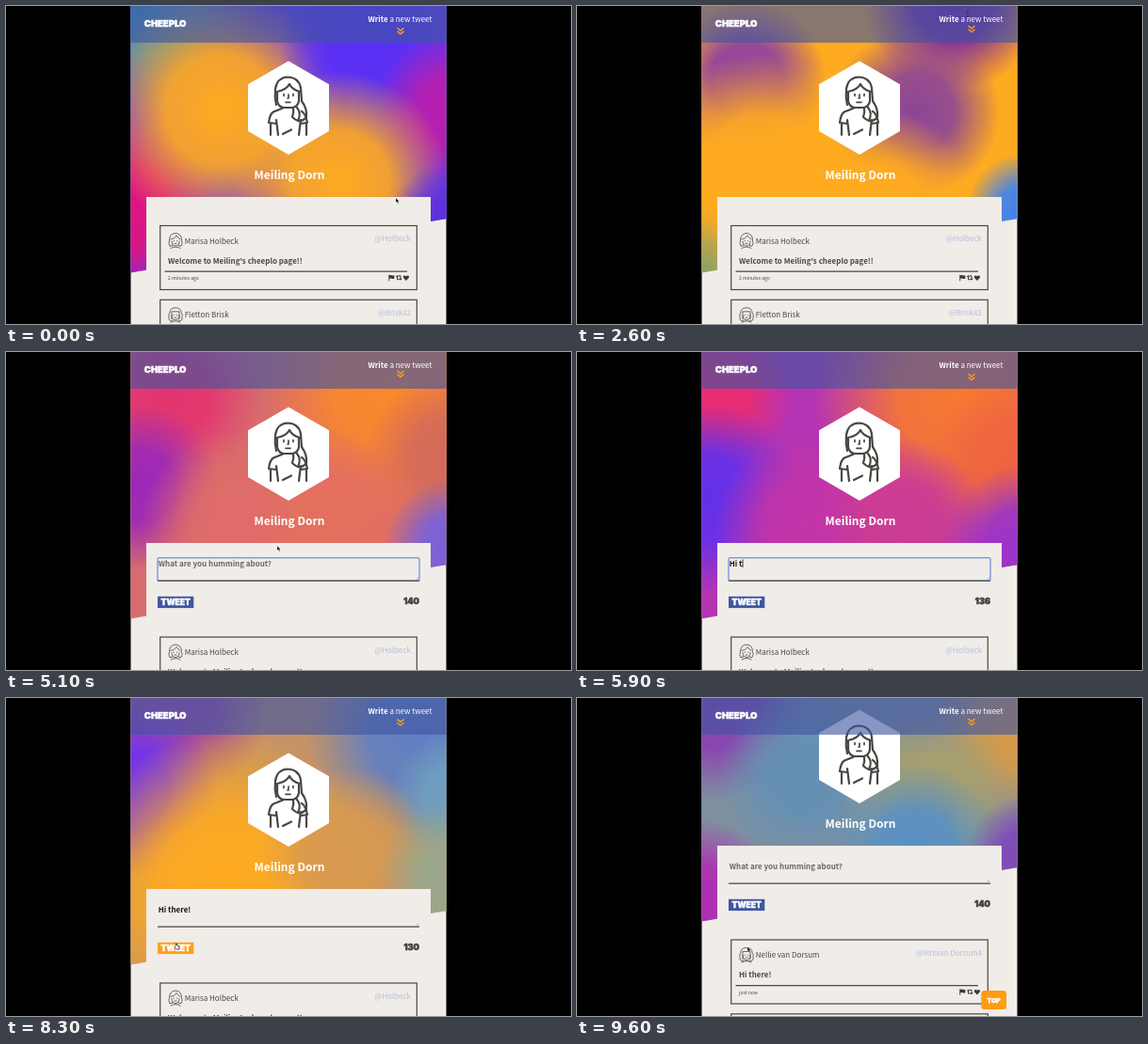
Animation of 600x338 px, one loop 9700 ms. Source, as an HTML page:

```html
<!DOCTYPE html>
<html lang="en">
<head>
<meta charset="utf-8">
<style>
html, body { margin: 0; width: 100%; height: 100%; overflow: hidden; background: #000; }
svg { display: block; width: 600px; height: 338px; }
text { font: 8px "Noto Sans CJK JP", "Noto Sans CJK SC", "Open Sans", sans-serif; fill: #4a4642; white-space: pre; }
.light { font-weight: 300; }
.bold { font-weight: 600; }
.end { text-anchor: end; }
.mid { text-anchor: middle; }
.white { fill: #fff; }
.block { font: 900 9.5px Inter, sans-serif; stroke: currentColor; stroke-width: .5; }
.line { fill: none; stroke: #4a4642; stroke-linecap: round; stroke-linejoin: round; }
</style>
</head>
<body>
<svg id="stage" viewBox="0 0 600 338">
  <defs>
    <clipPath id="column"><rect x="132.5" width="335" height="338"/></clipPath>
    <clipPath id="heroShape"><path d="M132 0H468V226L132 283.5Z"/></clipPath>
    <clipPath id="formShape"><rect id="formClip" x="149" y="203" width="302"/></clipPath>
    <g id="marks" fill="#3d3935">
      <path d="M406.3 52.8h.9v6.4h-.9zM407.2 53.2q1.3-.6 2.6 0t2.6 0v3.6q-1.3.6-2.6 0t-2.6 0z"/>
      <path d="M415.5 54v3.7h2.2M416.8 53.8h2.2v3.7" fill="none" stroke="#3d3935"/>
      <path d="M413.8 55l1.7-2 1.7 2zM417.3 56.8l1.7 2 1.7-2z"/>
      <path d="M424.9 59l-2.8-2.9q-.8-1.2.2-2.3 1.3-1 2.6.4 1.3-1.4 2.6-.4 1 1.1.2 2.3z"/>
    </g>
  </defs>
  <g clip-path="url(#column)">
    <rect x="132" width="336" height="338" fill="#f0ece7"/>
    <g id="page">
      <g id="hero" clip-path="url(#heroShape)"><rect id="base" x="132" width="336" height="290"/></g>
      <path d="M149 203H451V900H149Z" fill="#f0ece7"/>
      <path d="M300 58.5L343 83.3V133L300 158 257 133V83.3Z" fill="#fff"/>
      <g class="line" stroke-width="2.2">
        <path d="M287 105Q285 97 286 88 288 76 299 75.5 311 76 313 87L314 101Q320 109 319 118 315 123 310 122 314 114 309 108"/>
        <path d="M288 91Q298 89 301 83 304 89 312 91M288 91V101Q289 107 295 108H304Q310 107 311 101V91"/>
        <path d="M295 93.5v2M305 93.5v2M300 94v4h-1M297 102.3h5" stroke-width="1.7"/>
        <path d="M294 108.5Q288 111 284 112.5 280 115 279 124L287 125M287 121L289 137M281 125V137M305 109Q306 113 304 118 307 121 310 122M314 112Q318 114 320 124L313 125M313 121L311 137M319 125V137M294 136L303 131.5"/>
      </g>
      <text class="bold white mid" x="301" y="184.3" style="font-size:12px">Meiling Dorn</text>
      <g id="form" clip-path="url(#formShape)">
        <rect id="focus" x="161" y="218.8" width="278" height="24.5" rx="1" fill="none" stroke="#4878d8"/>
        <path d="M161 243.2H439" stroke="#4a4642" stroke-width="1.2"/>
        <path d="M435.5 241.7l2.5-2.5M437 241.7l1-1" stroke="#888" stroke-width=".5"/>
        <text id="draft" class="bold" x="161.8" y="228"></text>
        <path id="caret" stroke="#000" stroke-width=".8"/>
        <rect id="button" x="161" y="259.8" width="38.3" height="12.4"/>
        <text class="block white mid" x="180.2" y="269" style="font-size:8.5px;color:#fff">TWEET</text>
        <text id="counter" class="block end" x="439" y="268.2" style="font-size:9px;color:#3d3935"></text>
      </g>
      <g id="cards"></g>
    </g>
    <rect x="132" width="336" height="39" fill="#4056a1" opacity=".62"/>
    <text class="block white" x="146.8" y="22.4" style="color:#fff">CHEEPLO</text>
    <text class="white" x="384.5" y="17.2"><tspan font-weight="700">Write</tspan> a new tweet</text>
    <path id="chevrons" d="M415.5 -3.2l3.5 3 3.5-3M415.5 .4l3.5 3 3.5-3" fill="none" stroke="#ff9f1c" stroke-width="1.4"/>
    <g id="topButton">
      <rect x="429.3" y="311" width="26.7" height="20" rx="3.5" fill="#ff9c12"/>
      <text class="block white mid" x="442.7" y="323.6" style="font-size:6.8px;color:#fff">TOP</text>
    </g>
    <g id="cursor">
      <path id="arrow" d="M0 0V5l1.2-1 1 2 .9-.4-.9-1.9h1.5z" fill="#111" stroke="#fff" stroke-width=".3"/>
      <path id="beam" d="M-1.3-3h2.6M0-3V3M-1.3 3h2.6" stroke="#333" stroke-width=".7"/>
      <path id="hand" d="M-.8-1v-2.5h1.2v2l2.3.5v2.5l-.8 1.2h-2.2l-1.9-2.6z" fill="#fff" stroke="#111" stroke-width=".7"/>
    </g>
  </g>
</svg>
<script>
const LOOP = 9700, PITCH = 78.8, MESSAGE = 'Hi there! ';
const $ = id => document.getElementById(id);
const set = (node, attrs) => { for (const k in attrs) node.setAttribute(k, attrs[k]); };
const show = (id, on) => set($(id), { visibility: on ? 'visible' : 'hidden' });
const add = (parent, markup) => { parent.insertAdjacentHTML('beforeend', markup); return parent.lastElementChild; };

// Hero backdrop: time, base colour, then soft spots as colour, x, y, radius
const mood = [
  [0, '#6433ee', ['#3f92b8', 150, 0, 115], ['#e0147f', 128, 215, 100], ['#ffab20', 228, 110, 132],
    ['#5a30f5', 385, 45, 95], ['#b81fae', 475, 112, 85], ['#ffab20', 355, 185, 115], ['#5a30e0', 478, 238, 75]],
  [2600, '#ffab20', ['#8c3fa2', 180, 78, 85], ['#92a066', 130, 278, 65], ['#ffab20', 195, 170, 120],
    ['#7a22a6', 400, -5, 95], ['#8c4596', 360, 112, 90], ['#ffab20', 320, 215, 105], ['#3e82f0', 475, 218, 62]],
  [4200, '#ffab20', ['#dc3d6e', 205, 45, 115], ['#dc1f80', 140, 130, 75], ['#ffab20', 250, 190, 110],
    ['#fd9828', 410, 40, 115], ['#b47078', 475, 105, 85], ['#ffab20', 355, 160, 90], ['#4a94f0', 478, 210, 62]],
  [5900, '#b434b4', ['#ea2c70', 145, 45, 85], ['#6230ea', 140, 155, 100], ['#c234a8', 245, 185, 100],
    ['#f87a30', 415, 45, 165], ['#ee6440', 465, 115, 90], ['#cc3c94', 345, 180, 90], ['#9c34c8', 475, 205, 85]],
  [8300, '#c49266', ['#a444a0', 175, 5, 105], ['#6f30f0', 130, 98, 95], ['#ffab20', 235, 200, 165],
    ['#5f7fc4', 440, 40, 120], ['#6f9fc0', 478, 105, 70], ['#d89a50', 360, 165, 90], ['#98a88c', 475, 190, 80]],
  [9600, '#7e90a0', ['#8a40b0', 145, 55, 100], ['#b02cb4', 130, 265, 90], ['#6490b4', 240, 130, 90],
    ['#d89a48', 470, 80, 95], ['#a8a06c', 375, 150, 95], ['#5890c4', 360, 205, 90], ['#8048b8', 478, 215, 65]]
];

const lerp = (a, b, p) => a + (b - a) * p;
const ease = p => p * p * (3 - 2 * p);
const mix = (a, b, p) => `rgb(${[1, 3, 5].map(i =>
  Math.round(lerp(parseInt(a.slice(i, i + 2), 16), parseInt(b.slice(i, i + 2), 16), p)))})`;

// Eased value along [time, value] stops
function track(t, ...stops) {
  if (t <= stops[0][0]) return stops[0][1];
  for (let i = 1; i < stops.length; i++) {
    const [t0, a] = stops[i - 1], [t1, b] = stops[i];
    if (t < t1) return lerp(a, b, ease((t - t0) / (t1 - t0)));
  }
  return stops[stops.length - 1][1];
}

const spots = mood[0].slice(2).map((_, i) => ({
  paint: add($('hero'), `<radialGradient id="spot${i}">
    <stop stop-color="currentColor"/><stop offset=".45" stop-color="currentColor" stop-opacity=".9"/>
    <stop offset="1" stop-color="currentColor" stop-opacity="0"/></radialGradient>`),
  disc: add($('hero'), `<circle fill="url(#spot${i})"/>`)
}));

function drawHero(t) {
  let i = 0;
  while (i < mood.length - 2 && t >= mood[i + 1][0]) i++;
  const a = mood[i], b = mood[i + 1], p = Math.min(1, (t - a[0]) / (b[0] - a[0]));
  set($('base'), { fill: mix(a[1], b[1], p) });
  spots.forEach(({ paint, disc }, n) => {
    const from = a[n + 2], to = b[n + 2], at = k => lerp(from[k], to[k], p);
    paint.style.color = mix(from[0], to[0], p);
    set(disc, { cx: at(1), cy: at(2), r: at(3) });
  });
}

const hair = {
  bob: 'M174 22q-2-3-.5-6 0-7 6.5-7.500 6.500.5 6.500 7.500 1.500 3-.5 6-3 1-3-1M174 22q3 1 3-1M175 15q4 0 6-4 2 3 4 4',
  curls: 'M175 23q-3-1-2-4-1-3 1-5 0-5 6-5t6 5q2 2 1 5 1 3-2 4h-2M175 23h2M176 21v-8h8v8',
  glasses: 'M174 23V14q0-5 6-5t6 5v9h-2M174 23h2M175 13q5 0 10 0M176 15h3.500v2.500h-3.500zM180.500 15h3.500v2.500h-3.500z'
};
const people = [
  ['Nellie van Dorsum', '@Mrsvan Dorsum4', 'Hi there!', 'just now', 'curls'],
  ['Marisa Holbeck', '@Holbeck', "Welcome to Meiling's cheeplo page!!", '2 minutes ago', 'bob'],
  ['Fletton Brisk', '@Brisk42', "Welcome to Meiling's cheeplo page!", '5 minutes ago', 'curls'],
  ['Tessie Loman', '@Loman', 'Hi there!!!', '6 minutes ago', 'glasses'],
  ['Hattie Pemberdon', '@Pemberdon31', "Hi there! How's going?", '58 minutes ago', 'bob'],
  ['Marisa Holbeck', '@Holbeck', 'Hi there!', '1 hour ago', 'bob']
];
const cards = people.map(([name, handle, text, age, style]) => add($('cards'), `<g>
  <rect class="shadow" x="165.500" y="2.500" width="273" height="68.500" fill="#86aee0"/>
  <rect x="163.700" y=".5" width="272.600" height="68" fill="#f0ece7" stroke="#4a4642" stroke-width="1.200"/>
  <g class="line" stroke-width=".8"><path d="${hair[style]}"/>
    <path d="M176 17q0 5 4 5t4-5M178.300 16.500v.4M181.700 16.500v.4M179 19.500h2M175 24.500q5-3 10 0"/></g>
  <text class="light" x="189.700" y="19.500">${name}</text>
  <text class="light end" x="430" y="17.200" style="fill:#b4bfe0">${handle}</text>
  <text class="bold" x="172" y="40.600">${text}</text>
  <path d="M168.500 49.200H426" stroke="#4a4642" stroke-width="1.200"/>
  <text class="light" x="172" y="58.400" style="font-size:5.050px">${age}</text>
  <use href="#marks"/></g>`));

function draw(now) {
  const t = Math.floor(now % LOOP / 100) * 100;
  const posted = t >= 8600, typing = t >= 5300 && !posted;
  const scroll = track(t, [500, 0], [1300, 204], [1600, 204], [2200, 0], [9000, 0], [9500, 46]);
  const open = track(t, [3000, 0], [3400, 69.5]);
  const x = track(t, [2200, 414], [2600, 415], [3200, 416], [3900, 288], [7200, 288], [8000, 181]);
  const y = track(t, [2000, 204], [2500, 8], [3200, 14], [3900, 206], [7200, 206], [8000, 264.5]);

  drawHero(t);
  set($('page'), { transform: `translate(0 ${-scroll})` });
  set($('formClip'), { height: open });
  set($('chevrons'), { transform: `translate(0 ${24.8 + 1.7 * Math.cos(t * Math.PI / 1000)})` });
  show('topButton', scroll > 40);

  cards.forEach((card, i) => {
    const top = 233 + open + (i - !posted) * PITCH;
    const hover = t < 3000 && y > top - scroll && y < top - scroll + 69;
    set(card, { transform: `translate(0 ${top})`, visibility: i || posted ? 'visible' : 'hidden' });
    set(card.querySelector('.shadow'), { opacity: +hover });
  });

  const typed = typing ? MESSAGE.slice(0, 1 + Math.floor((t - 5300) / 170)) : '';
  const focused = t >= 3400 && t < 8200, draft = $('draft');
  draft.textContent = typed || 'What are you humming about?';
  draft.style.fill = typed ? '#111' : '#6b6762';
  $('counter').textContent = 140 - typed.length;
  show('focus', focused);
  show('caret', focused && typed);
  const end = 162.3 + (typed ? draft.getComputedTextLength() : 0);
  set($('caret'), { d: `M${end} 220.500v8.500` });

  const onButton = t >= 7900 && t < 9000, onText = t >= 2400 && t < 3400;
  set($('button'), { fill: onButton ? '#ff9f1c' : '#4056a1' });
  set($('cursor'), { transform: `translate(${x} ${y})`, opacity: t >= 5300 && t < 7200 ? 0 : 1 });
  show('arrow', !onButton && !onText);
  show('beam', onText);
  show('hand', onButton);
  requestAnimationFrame(draw);
}
requestAnimationFrame(draw);
</script>
</body>
</html>
```
